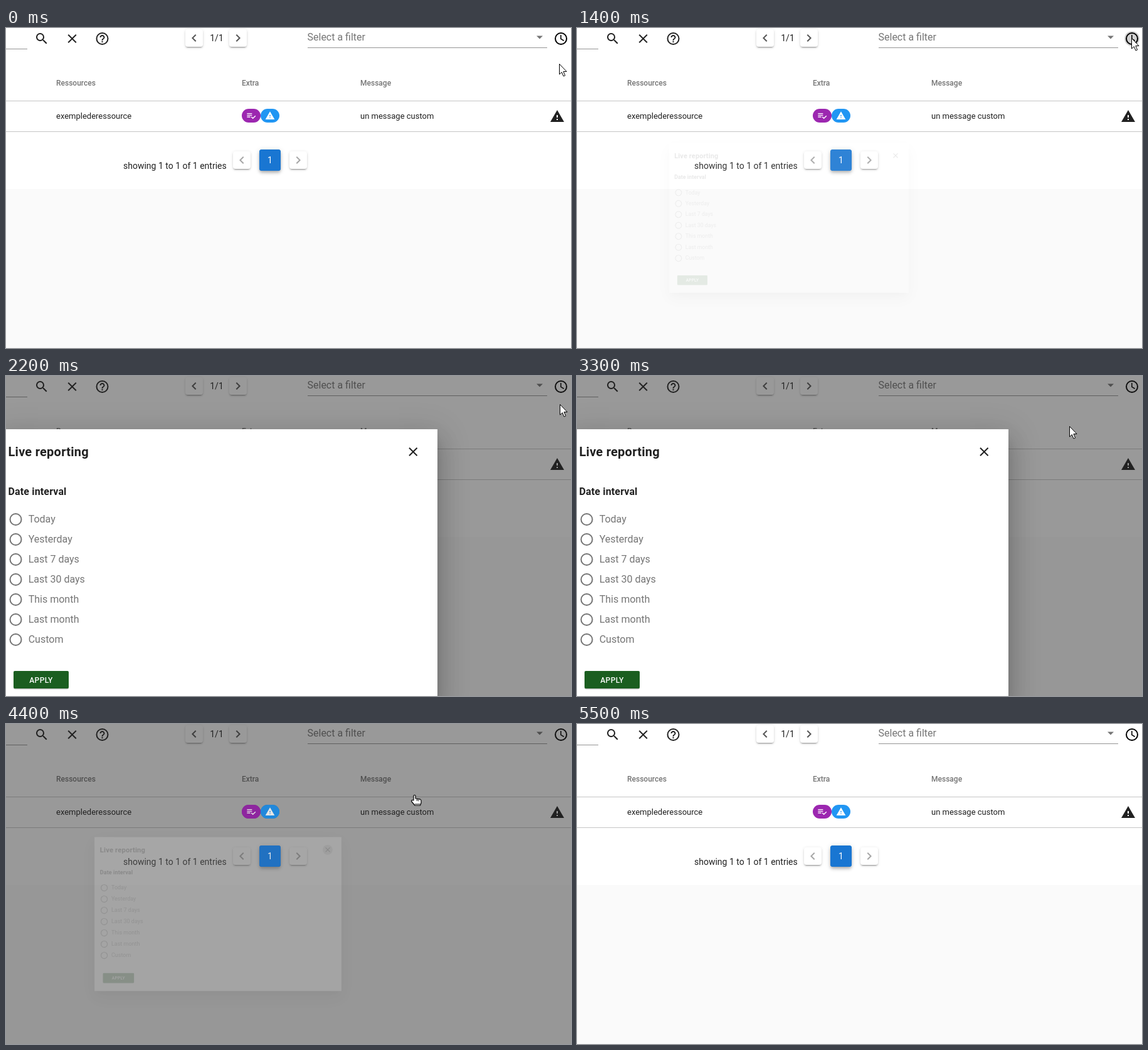
Recreate the animation shown at these times as an HTML page. Size 901x511 px, loop 6900 ms.

```html
<!DOCTYPE html>
<html lang="en">
<head>
<meta charset="utf-8">
<title>Live reporting</title>
<style>
html, body { margin: 0; width: 100%; height: 100%; overflow: hidden; background: #fafafa; }
#stage { position: absolute; left: 0; top: 0; width: 901px; height: 511px; overflow: hidden;
  background: linear-gradient(#fff 257px, #fafafa 257px); font-family: Roboto, Arial, sans-serif; }
#stage > * { position: absolute; }
svg { display: block; left: 0; top: 0; overflow: visible; }
.btn { width: 28px; height: 28px; border-radius: 4px; background: #fff;
  box-shadow: 0 3px 1px -2px rgba(0,0,0,.2), 0 2px 2px rgba(0,0,0,.14), 0 1px 5px rgba(0,0,0,.12); }
.page { width: 34px; height: 34px; background: #1976d2;
  box-shadow: 0 2px 4px -1px rgba(0,0,0,.2), 0 4px 5px rgba(0,0,0,.14), 0 1px 10px rgba(0,0,0,.12); }
#scrim { inset: 0; background: #212121; }
#dialog { left: -12px; top: 85px; width: 700px; height: 437px; background: #fff;
  box-shadow: 0 11px 15px -7px rgba(0,0,0,.2), 0 24px 38px 3px rgba(0,0,0,.14), 0 9px 46px 8px rgba(0,0,0,.12); }
.head { font-size: 12px; font-weight: 500; fill: #757575; }
.cell { font-size: 13px; }
.label { font-size: 16px; fill: #757575; }
</style>
</head>
<body>
<div id="stage">
  <div class="btn" style="left:286px;top:2px"></div>
  <div class="btn" style="left:356px;top:2px"></div>
  <div class="btn" style="left:362px;top:197px"></div>
  <div class="btn" style="left:452px;top:197px"></div>
  <div class="btn page" style="left:404px;top:194px"></div>

  <svg width="901" height="511" fill="#212121" font-size="14">
    <defs>
      <path id="close" d="M19 6.41 17.59 5 12 10.59 6.41 5 5 6.41 10.59 12 5 17.59 6.41 19 12 13.41 17.59 19 19 17.59 13.41 12z"/>
      <path id="left" d="M15.41 7.41 14 6 8 12l6 6 1.41-1.41L10.83 12z"/>
      <path id="right" d="M8.59 16.59 13.17 12 8.59 7.41 10 6l6 6-6 6z"/>
      <path id="alert" d="M13 14H11V10H13M13 18H11V16H13M1 21H23L12 2z"/>
    </defs>
    <path d="M0 33.5H34" stroke="#949494"/>
    <path transform="translate(45 5)" d="M9.5 3A6.5 6.5 0 0 1 16 9.5C16 11.11 15.41 12.59 14.44 13.73L14.71 14H15.5L20.5 19 19 20.5 14 15.5V14.71L13.73 14.44A6.5 6.5 0 1 1 9.5 3M9.5 5a4.5 4.5 0 1 0 0 9a4.5 4.5 0 1 0 0-9"/>
    <use href="#close" x="93.5" y="5"/>
    <g transform="translate(141.5 5)">
      <circle cx="12" cy="12" r="9" fill="none" stroke="#212121" stroke-width="2"/>
      <path d="M11 18h2v-2h-2zM12 6c-2.21 0-4 1.79-4 4h2c0-1.1.9-2 2-2s2 .9 2 2c0 2-3 1.75-3 5h2c0-2.25 3-2.5 3-5 0-2.21-1.79-4-4-4z"/>
    </g>
    <use href="#left" x="288" y="4" fill="#555"/>
    <use href="#right" x="358" y="4" fill="#555"/>
    <text x="336" y="21" text-anchor="middle">1/1</text>
    <text class="label" x="480.5" y="20">Select a filter</text>
    <path id="line" d="M481 31.5H863" stroke="#949494"/>
    <path id="caret" d="M846 12.5h10l-5 5z" fill="#757575"/>
    <circle id="ripple" cx="885" cy="17" r="12" fill="#000"/>
    <g fill="none" stroke="#000" stroke-width="2">
      <circle cx="885" cy="17" r="9"/>
      <path d="M884.8 11V17.4L889.6 20.3" stroke-width="1.6"/>
    </g>
    <g class="head">
      <text x="80" y="92">Ressources</text>
      <text x="376" y="92">Extra</text>
      <text x="565" y="92">Message</text>
    </g>
    <path d="M0 116.5H901M0 165.5H901" stroke="#c6c6c6"/>
    <text class="cell" x="80" y="145">exemplederessource</text>
    <text class="cell" x="565" y="145">un message custom</text>
    <use href="#alert" x="867" y="129"/>
    <text x="187" y="225">showing 1 to 1 of 1 entries</text>
    <use href="#left" x="364" y="199" fill="#a6a6a6"/>
    <use href="#right" x="454" y="199" fill="#a6a6a6"/>
    <g id="vivid">
      <rect x="376" y="129" width="30" height="22" rx="11" fill="#9c27b0"/>
      <rect x="406" y="129" width="30" height="22" rx="11" fill="#2196f3"/>
      <rect x="404" y="194" width="34" height="34" rx="4" fill="#1976d2"/>
      <g fill="#fff">
        <path transform="translate(383 132) scale(.667)" d="M14 10H2v2h12zM14 6H2v2h12zM2 16h8v-2H2zM21.5 11.5 23 13l-6.99 7-4.51-4.5L13 14l3.01 3z"/>
        <use href="#alert" transform="translate(413 132) scale(.667)"/>
        <text x="421" y="216" text-anchor="middle">1</text>
      </g>
    </g>
  </svg>

  <div id="scrim"></div>
  <div id="dialog">
    <svg width="700" height="437" viewBox="-12 85 700 437" fill="#212121">
      <text x="3.5" y="128" font-size="20" font-weight="700" letter-spacing=".25">Live reporting</text>
      <circle id="halo" cx="649" cy="121" r="14" fill="#000"/>
      <use href="#close" x="637.3" y="109"/>
      <text x="3.5" y="190" font-size="16" font-weight="700" letter-spacing=".15">Date interval</text>
      <g id="options" class="label"></g>
      <rect x="12" y="472.5" width="88" height="28" rx="3" opacity=".25"/>
      <rect x="12" y="471" width="88" height="28" rx="2" fill="#1b5e20"/>
      <text x="56" y="490" font-size="12" font-weight="500" letter-spacing=".4" fill="#fff" text-anchor="middle">APPLY</text>
    </svg>
  </div>

  <svg width="901" height="511">
    <use id="glow" href="#vivid" font-size="14" opacity=".75"/>
    <g id="cursor" fill="#fff" stroke="#000" stroke-linejoin="round">
      <path id="arrow" d="M.5 .5V17L4.3 13.6 7 20 9.6 18.9 6.9 12.5H12z"/>
      <g id="hand">
        <path stroke-width="1.2" d="M4 9V2a1.5 1.5 0 0 1 3 0V6L14.5 7.2Q16 7.8 16 10V13L14.5 17H6L1 11Q0 9 1.5 8.5z"/>
        <path d="M9.5 7v3M12 7.3v3M6 15h8.5"/>
      </g>
    </g>
  </svg>
</div>
<script>
const LOOP = 6900, STEP = 100;
const $ = id => document.getElementById(id);
const clamp = x => Math.max(0, Math.min(1, x));
const swing = x => 1 - (1 - clamp(x)) ** 2.86;
const show = (id, on) => { $(id).style.display = on ? "" : "none"; };

// time, x, y
const path = [
  [0, 882, 57], [300, 882, 57], [900, 884, 30], [1000, 884, 20], [1200, 884, 16],
  [1700, 884, 16], [2200, 883, 45], [2700, 883, 45], [3000, 868, 51], [3300, 785, 80],
  [3400, 753, 91], [3500, 722, 97], [3700, 670, 108], [3900, 645, 110], [4000, 641, 107],
  [4100, 641, 107], [4200, 646, 113], [4800, 646, 113], [5100, 660, 50], [5400, 672, 3],
  [5500, 680, -40], [LOOP, 680, -40]
];

function pointer(t) {
  const i = path.findIndex(k => k[0] > t);
  const [t0, x0, y0] = path[i - 1], [t1, x1, y1] = path[i];
  const f = (t - t0) / (t1 - t0);
  return [x0 + (x1 - x0) * f, y0 + (y1 - y0) * f].map(Math.round);
}

$("options").innerHTML = ["Today", "Yesterday", "Last 7 days", "Last 30 days", "This month", "Last month", "Custom"]
  .map((name, i) => `<circle cx="15.5" cy="${229 + 32 * i}" r="9" fill="none" stroke="#757575" stroke-width="2"/>
    <text x="35.7" y="${234 + 32 * i}">${name}</text>`).join("");

function draw(t) {
  const [x, y] = pointer(t);
  const closing = t >= 4400 && t < 4700;
  const open = t >= 4700 ? 0 : closing ? .125 : swing((t - 1390) / 300);
  $("dialog").style.opacity = open;
  $("dialog").style.transform = open < 1 ? `scale(${.5 + open / 2})` : "none";
  $("scrim").style.opacity = t >= 4700 ? 0 : .46 * clamp((t - 1520) / 180);
  show("glow", closing);

  $("ripple").setAttribute("opacity", t < 1100 || t >= 1800 ? 0 : t < 1300 ? .06 : .18);
  $("halo").setAttribute("opacity", t < 3800 ? 0 : t < 4200 ? .1 : .24);

  const hover = t >= 4900 && y > -10 && y < 32;
  $("line").setAttribute("stroke", hover ? "#212121" : "#949494");

  const hand = t >= 3800 && t < 4700;
  $("cursor").setAttribute("transform", `translate(${x} ${y})`);
  show("arrow", !hand);
  show("hand", hand);
}

const start = performance.now();
function tick() {
  const t = (performance.now() - start) % LOOP;
  draw(Math.floor(t / STEP) * STEP);
  requestAnimationFrame(tick);
}
tick();
</script>
</body>
</html>
```
